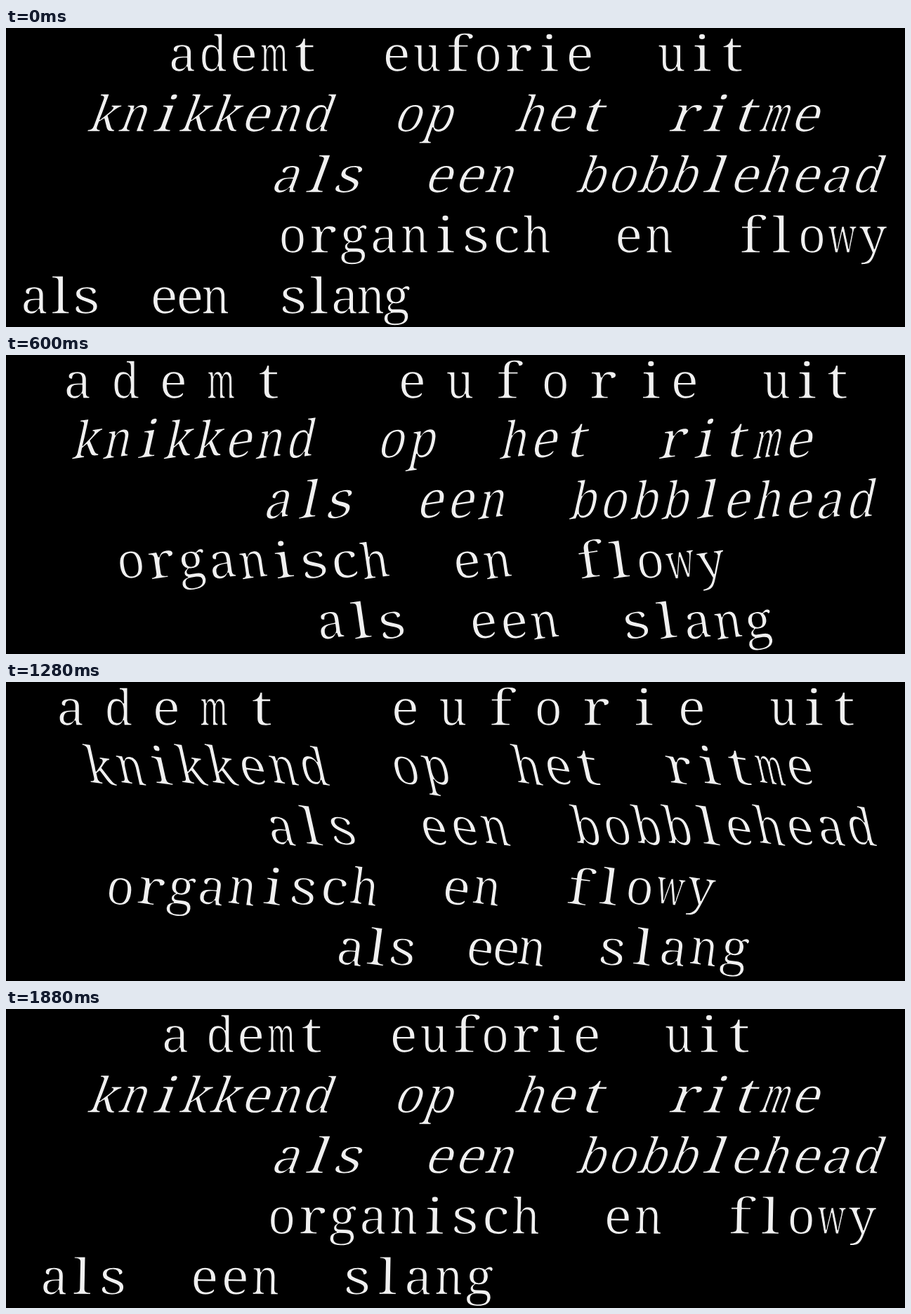
Write an HTML page with a canvas that moves like this. It is 1280 px wide and 427 px high and loops after 1920 ms.

```html
<!DOCTYPE html>
<html lang="nl">
<head>
<meta charset="utf-8">
<title>ademt euforie uit</title>
<style>
  html, body { margin: 0; width: 100%; height: 100%; overflow: hidden; background: #000; }
  canvas { display: block; width: 1280px; height: 427px; }
</style>
</head>
<body>
<canvas id="stage" width="1280" height="427"></canvas>
<script>
const ctx = document.getElementById('stage').getContext('2d');
const LOOP = 1920, STEP = 40;
const PITCH = 43.5, WIDE = 68, TIGHT = 36.8;
const CELL = 40, HALF_X = 19;

const radians = degrees => degrees * Math.PI / 180;
const mix = (a, b, k) => a + (b - a) * k;
const clamp = (v, lo, hi) => Math.min(hi, Math.max(lo, v));
const ramp = (from, to, t) => clamp((t - from) / (to - from), 0, 1);
const baseline = row => 62 + 86.4 * row;

const widths = {};
function glyph(char, x, y, angle, lean) {
  if (char === ' ') return;
  widths[char] ??= ctx.measureText(char).width;
  ctx.save();
  ctx.translate(x, y - HALF_X);
  ctx.rotate(angle);
  ctx.transform(1, 0, -Math.tan(lean), 1, 0, 0);
  // Monospaced cell: wide letters narrow, slim letters widen a little.
  ctx.scale(clamp(CELL / widths[char], 0.5, 1.25), 1);
  ctx.fillText(char, 0, HALF_X);
  ctx.strokeText(char, 0, HALF_X); // black outline slims the strokes
  ctx.restore();
}

function line(text, row, letterX, { lift = 0, angle = 0, lean = 0 } = {}) {
  [...text].forEach((char, i) =>
    glyph(char, letterX(i, text.length - 1), baseline(row) + lift, angle, lean));
}

// Offset of letter i when the first `count` gaps differ from the rest.
const spaced = (i, count, first, rest) =>
  Math.min(i, count) * first + Math.max(0, i - count) * rest;

// Words drift left, then snap back each time the lean flips.
function sway(t) {
  if (t < 800) return mix(0, -20, t / 800);
  if (t < 1080) return mix(-20, 31, ramp(800, 1080, t));
  if (t < 1560) return mix(31, -34, ramp(1080, 1560, t));
  return mix(-34, 0, ramp(1560, 1860, t));
}

function draw(t) {
  ctx.fillStyle = '#000';
  ctx.fillRect(0, 0, 1280, 427);
  ctx.fillStyle = '#f0f0f0';
  ctx.strokeStyle = '#000';
  ctx.lineWidth = 1.6;
  ctx.lineJoin = 'round';
  ctx.font = '300 71px "Noto Serif", "Liberation Serif", serif';
  ctx.textAlign = 'center';

  const turn = 2 * Math.PI / LOOP;
  const sweep = 1 - Math.abs(1 - 2 * t / LOOP);
  const hump = Math.sin(turn * t / 2) ** 2;
  const tilt = { lift: -4 * hump, angle: radians(-9 * Math.sin(turn * t)) };
  const nod = { ...tilt, lean: radians(21 * Math.tanh(3 * (Math.cos(turn * (t - 370)) + 0.29))) };

  // Breathing: wide gaps spread from the left, the line stays centred.
  const open = Math.min(18, 19.5 * sweep);
  line('ademt  euforie  uit', 0, (i, last) =>
    643 + spaced(i, open, WIDE, PITCH) - spaced(last, open, WIDE, PITCH) / 2);

  // Nodding: the end of the line sways least.
  const swayed = (left, amount) => (i, last) =>
    left + i * PITCH - 14 * hump + amount * sway(t) * Math.min(1, (last - i) / 8);
  line('knikkend  op  het  ritme', 1, swayed(141, 1), nod);
  line('als  een  bobblehead', 2, swayed(402, 0.2), nod);

  // Slithering: two lines slide in opposite directions.
  line('organisch  en  flowy', 3, i => mix(408, 40, sweep) + i * PITCH, tilt);
  const tight = 14 * Math.max(1 - ramp(0, 200, t), Math.min(sweep, ramp(700, 1000, t)));
  line('als  een  slang', 4, i => mix(41, 716, sweep) + spaced(i, tight, TIGHT, PITCH), tilt);
}

const begin = performance.now();
function tick() {
  const t = (performance.now() - begin) % LOOP;
  draw(Math.floor(t / STEP) * STEP);
  requestAnimationFrame(tick);
}
tick();
</script>
</body>
</html>
```
